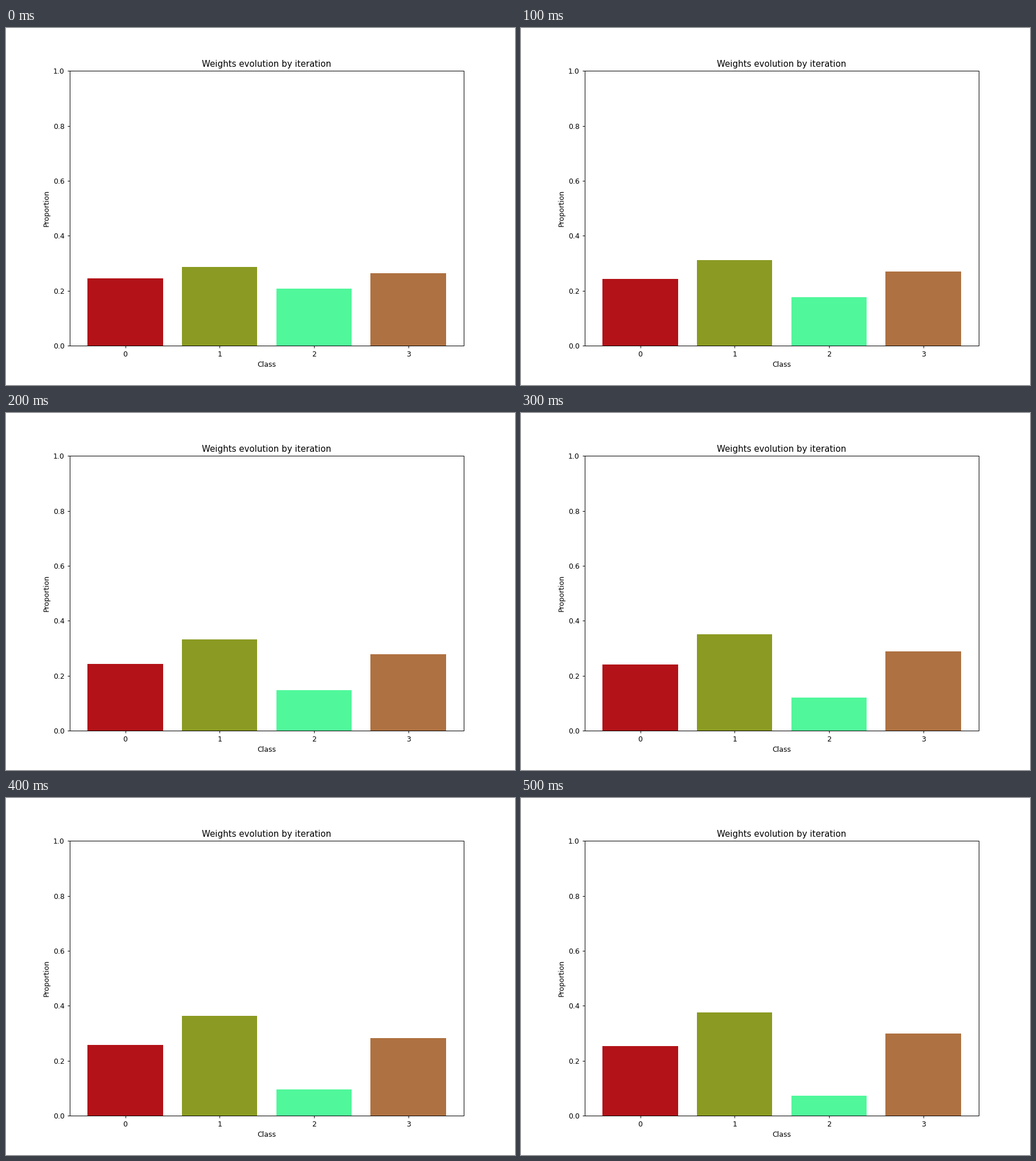
Animation, 894 px wide and 626 px high, one loop 0.6 s. Source, as a matplotlib script:

```python
import numpy as np
import matplotlib.pyplot as plt
from matplotlib.animation import FuncAnimation

DPI = 90
FRAMES = 6
COLORS = ["#b21218", "#8b9a22", "#50f89b", "#ae7141"]


def ease(start, end, t, bend=0.0):
    """Move from start to end, slowing down more for a larger bend."""
    return start + (end - start) * t * (1 + bend * (1 - t))


def weights(t):
    """Class shares at progress t; they always sum to one."""
    trade = 0.016 * t**2 * np.sin(3 * np.pi * t)  # passes from class 3 to 0
    one = ease(0.2857, 0.375, t, bend=0.5)
    two = ease(0.207, 0.073, t, bend=0.2)
    three = ease(0.263, 0.299, t) - trade
    return 1 - one - two - three, one, two, three


fig, ax = plt.subplots(figsize=(894 / DPI, 626 / DPI), dpi=DPI)
fig.subplots_adjust(left=0.125, right=0.8997, bottom=0.11, top=0.88)
classes = range(len(COLORS))
bars = ax.bar(classes, weights(0), color=COLORS)
ax.set_xticks(classes)
ax.set_ylim(0, 1)
ax.set_title("Weights evolution by iteration")
ax.set_xlabel("Class")
ax.set_ylabel("Proportion")


def update(frame):
    for bar, weight in zip(bars, weights(frame / (FRAMES - 1))):
        bar.set_height(weight)
    return list(bars)


anim = FuncAnimation(fig, update, frames=FRAMES, interval=100,
                     repeat=True, repeat_delay=0)
plt.show()
```
